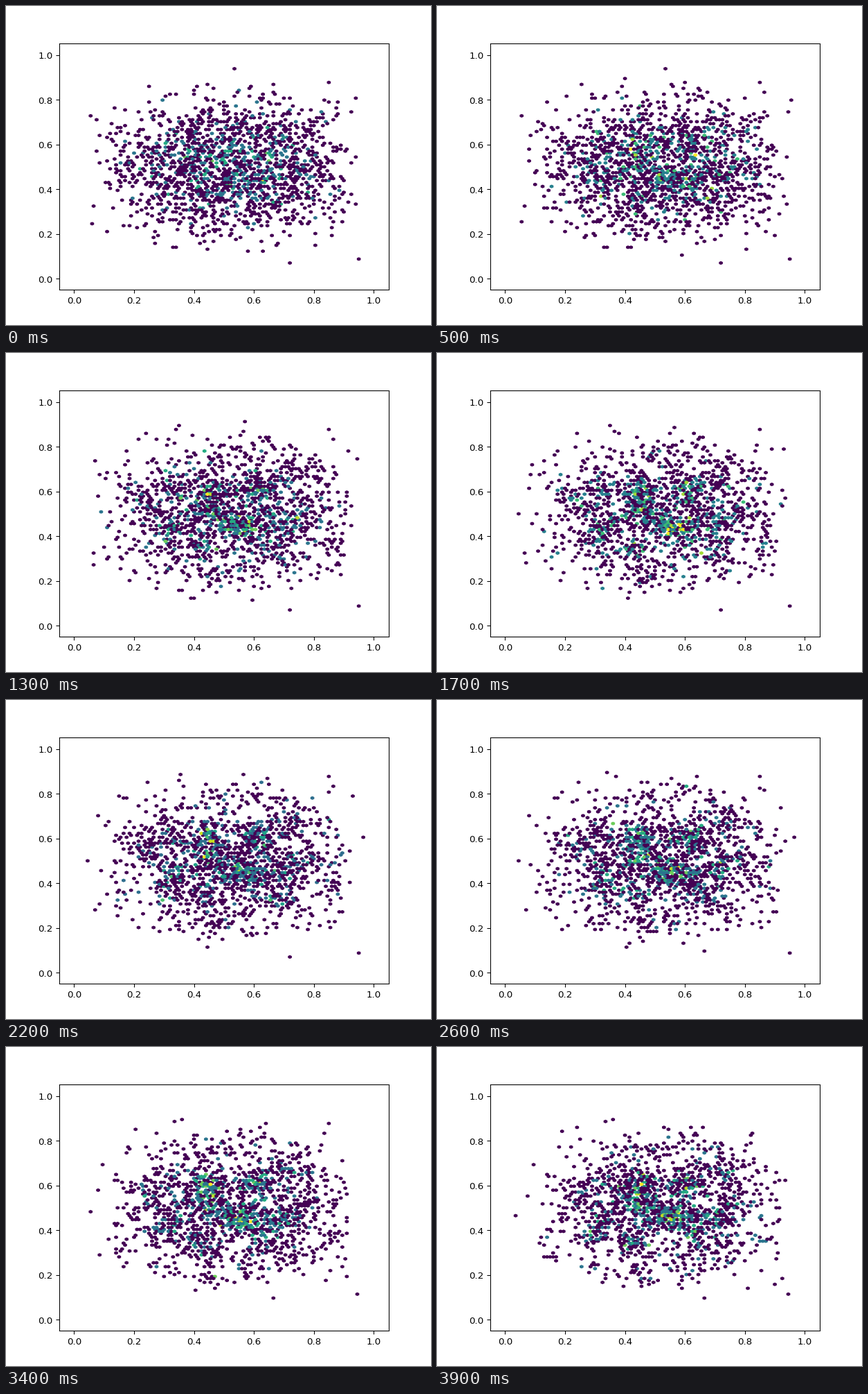
These frames come from a looping animation (614 by 460 pixels, 4.5 s). A matplotlib script:

```python
import numpy as np
import matplotlib.pyplot as plt
from matplotlib.animation import FuncAnimation

FRAMES = 45
LAST_STEP = 39          # the final picture is held until the loop ends
CENTER = np.array([0.535, 0.5])
RADII = np.array([0.45, 0.365])
MAIN_HUBS = [(0.45, 0.63), (0.53, 0.45), (0.78, 0.52)]
LONERS = [(0.535, 0.94), (0.06, 0.246), (0.055, 0.728),
          (0.72, 0.07), (0.25, 0.86), (0.95, 0.088)]

rng = np.random.default_rng(12)


def make_hubs(columns=6, rows=5):
    """Gathering spots: a loose grid and a few strong ones."""
    x, y = np.meshgrid(np.linspace(0.2, 0.87, columns),
                       np.linspace(0.22, 0.75, rows))
    grid = np.column_stack([x.ravel(), y.ravel()])
    return np.vstack([grid + rng.normal(0, 0.03, grid.shape), MAIN_HUBS])


def make_crowd(count=1900):
    points = np.column_stack([rng.beta(3.4, 3.1, count),
                              rng.beta(5.8, 5.7, count)])
    return np.vstack([points[rim(points) < 1.6], LONERS])


def rim(points):
    """Below 1 inside the rounded area that the crowd fills."""
    return (np.abs((points - CENTER) / RADII) ** 2.6).sum(axis=1)


def pull(points, hubs, width=0.035):
    """Drift towards the nearby hubs, plus a faint one to the middle."""
    gap = hubs[None] - points[:, None]
    weight = np.exp(-(gap ** 2).sum(axis=2) / (2 * width ** 2))[..., None]
    drift = (gap * weight).sum(axis=1) / (0.5 + weight.sum(axis=1))
    return 0.2 * drift + 0.01 * (CENTER - points)


def walk(points, hubs):
    """Crowded points wander often, lonely ones mostly stay."""
    states = [points]
    for _ in range(LAST_STEP):
        goal = points + pull(points, hubs) + rng.normal(0, 0.017, points.shape)
        active = rng.random(len(points)) < 0.04 + 0.7 * np.exp(-rim(points))
        active &= (rim(goal) < 1.5) | (rim(goal) < rim(points))
        points = np.where(active[:, None], goal, points)
        states.append(points)
    return states


states = walk(make_crowd(), make_hubs())
fig, ax = plt.subplots(figsize=(6.4, 4.8), dpi=96)


def draw(frame):
    x, y = states[min(frame, LAST_STEP)].T
    ax.clear()
    return [ax.hexbin(x, y, gridsize=100, extent=(0, 1, 0, 1),
                      bins="log", mincnt=1, cmap="viridis")]


anim = FuncAnimation(fig, draw, frames=FRAMES, interval=100, repeat=True)
plt.show()
```
